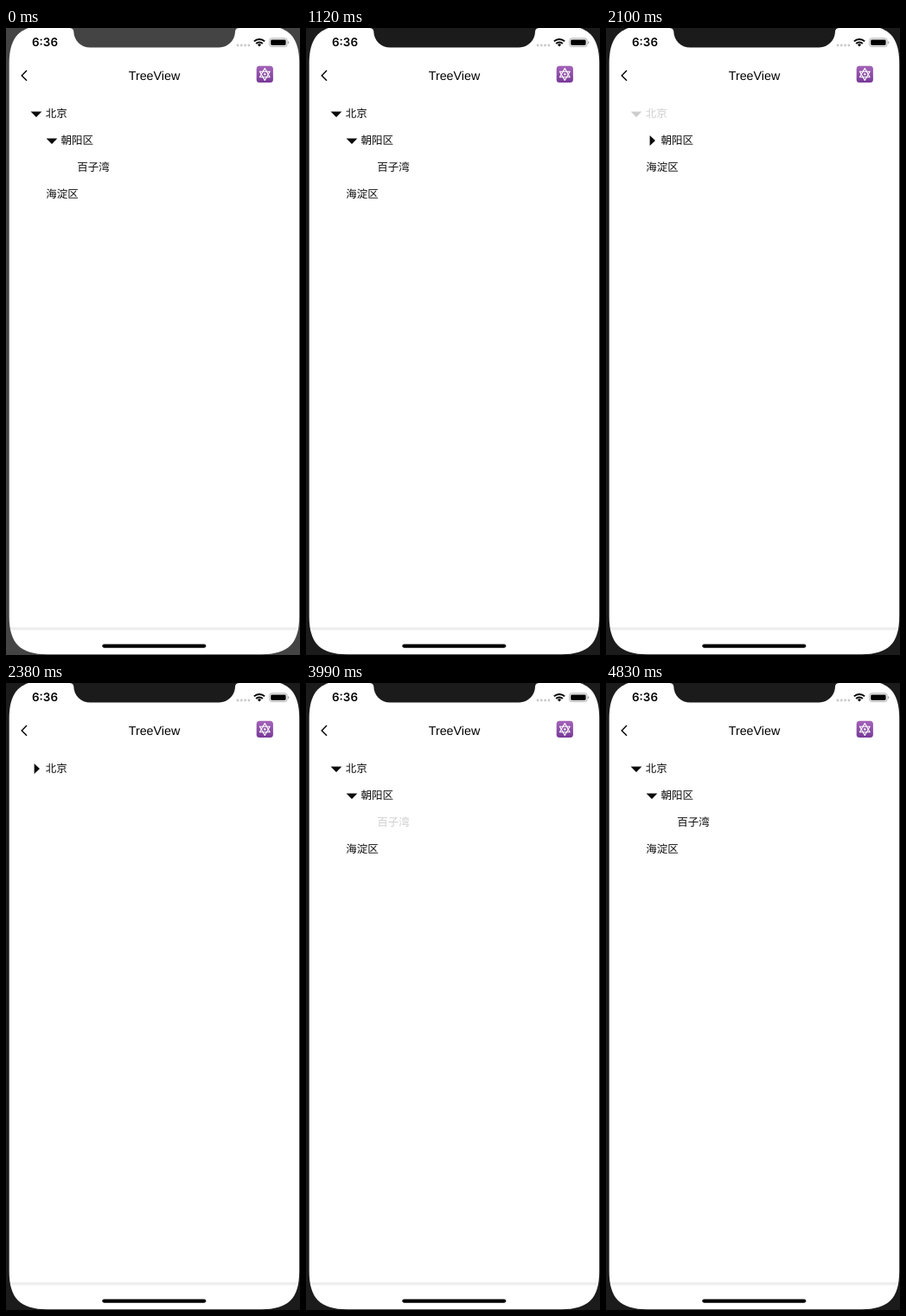
Animation of 340 by 724 pixels, one loop 5950 ms. Source, as an HTML page:

```html
<!DOCTYPE html>
<html lang="zh-CN">
<head>
<meta charset="utf-8">
<title>TreeView</title>
<style>
  html, body { margin: 0; width: 100%; height: 100%; overflow: hidden; background: #fff; }
  svg { display: block; width: 340px; height: 724px; }
  text { text-rendering: geometricPrecision; }
  .row { font: 12.53px "Noto Sans CJK SC", "Noto Sans CJK", sans-serif; fill: #0a0a0a; }
  .title { font: 14.3px "Liberation Sans", Arial, sans-serif; }
  .clock { font: 600 13.4px Inter, sans-serif; }
</style>
</head>
<body>
<svg viewBox="0 0 340 724">
  <defs>
    <linearGradient id="purple" x1="0" y1="0" x2="0" y2="1">
      <stop offset="0" stop-color="#a564b9"/>
      <stop offset="1" stop-color="#773a98"/>
    </linearGradient>
  </defs>

  <rect class="bezel" width="340" height="724"/>
  <path id="screen" fill="#fff"/>
  <path class="bezel" d="M73 0Q78 0 78.3 4C78.4 14.4 86.9 22.6 97.4 22.6H246C256.5 22.6 264.8 14.4 265 4Q265.3 0 270 0Z"/>

  <text class="clock" x="45" y="21.4" text-anchor="middle">6:36</text>
  <g fill="#c8c8c8">
    <circle cx="268" cy="20" r="1.4"/>
    <circle cx="272.3" cy="20" r="1.4"/>
    <circle cx="276.6" cy="20" r="1.4"/>
    <circle cx="280.9" cy="20" r="1.4"/>
  </g>
  <g fill="none" stroke="#000" stroke-width="2">
    <path d="M286.9 15.4A8.7 8.7 0 0 1 299.1 15.4"/>
    <path d="M289.2 18A5.4 5.4 0 0 1 296.8 18"/>
  </g>
  <path d="M290.9 19.2A3 3 0 0 1 295.1 19.2L293 21.4Z"/>
  <rect x="304.7" y="11.9" width="20.4" height="9.6" rx="2.7" fill="none" stroke="#a6a6a6" stroke-width=".9"/>
  <rect x="306.2" y="13.4" width="17.4" height="6.6" rx="1.4"/>
  <path d="M326 15.2Q327.4 15.6 327.4 16.7T326 18.2Z" fill="#a6a6a6"/>

  <path d="M24 49L18.2 54.9L24 60.8" fill="none" stroke="#000" stroke-width="1.4"/>
  <text class="title" x="171.5" y="60" text-anchor="middle">TreeView</text>

  <rect x="289.7" y="43.8" width="19.2" height="19.2" rx="3.5" fill="url(#purple)"/>
  <g fill="none" stroke="#fff" stroke-width="1.1" stroke-linejoin="round">
    <path d="M299.3 46.6L305.2 56.8H293.4Z"/>
    <path d="M299.3 60.4L293.4 50.2H305.2Z"/>
  </g>
  <circle cx="299.3" cy="53.5" r="1.3" fill="#fff"/>

  <g id="tree"></g>

  <rect x="5" y="692" width="331" height="3.4" fill="#eee"/>
  <rect x="111.3" y="711.5" width="120" height="4.2" rx="2.1"/>
</svg>
<script>
const LOOP = 5950, STEP = 70, FADE = 250, DIM = 0.2;
const ROW_TOP = 99, ROW_GAP = 31;

const rows = {
  city:   { text: '北京', x: 45.7, arrow: 35 },
  area:   { text: '朝阳区', x: 63.6, arrow: 53 },
  place:  { text: '百子湾', x: 82.2 },
  nearby: { text: '海淀区', x: 46.3 }
};

// A row dims at `down` and fades back from `up`.
const taps = [
  { row: 'area', down: 1190, up: 1130 },
  { row: 'city', down: 2100, up: 2120 },
  { row: 'city', down: 2800, up: 2740 },
  { row: 'place', down: 3990, up: 4010 },
  { row: 'nearby', down: 4480, up: 4560 }
];

const tree = document.getElementById('tree');
const bezel = document.querySelectorAll('.bezel');

function add(parent, tag, attrs) {
  const el = document.createElementNS('http://www.w3.org/2000/svg', tag);
  for (const key in attrs) el.setAttribute(key, attrs[key]);
  return parent.appendChild(el);
}

// Rectangle with smooth corners: `r` is their reach, `c` the handle's gap to the corner.
function smoothRect(l, t, r, b, reach, c) {
  return `M${l} ${t + reach}C${l} ${t + c} ${l + c} ${t} ${l + reach} ${t}` +
    `H${r - reach}C${r - c} ${t} ${r} ${t + c} ${r} ${t + reach}` +
    `V${b - reach}C${r} ${b - c} ${r - c} ${b} ${r - reach} ${b}` +
    `H${l + reach}C${l + c} ${b} ${l} ${b - c} ${l} ${b - reach}Z`;
}

document.getElementById('screen')
  .setAttribute('d', smoothRect(3.7, -3, 339.2, 723.2, 44, 12.7));

for (const row of Object.values(rows)) {
  row.el = add(tree, 'g', { class: 'row' });
  add(row.el, 'text', { x: row.x, y: 3.8 }).textContent = row.text;
  if (row.arrow) row.mark = add(row.el, 'path', {});
}

const easeInOut = p => p < 0.5 ? 2 * p * p : 1 - 2 * (1 - p) * (1 - p);

function opacity(name, t) {
  const tap = taps.find(k => k.row === name && t >= k.down && t < k.up + FADE);
  if (!tap) return 1;
  return DIM + (1 - DIM) * easeInOut(Math.max(0, (t - tap.up) / FADE));
}

function arrowPath(x, open) {
  return open
    ? `M${x - 6.4} -2.4H${x + 6.4}L${x} 4Z`
    : `M${x - 2.4} -6.1V6L${x + 4} 0Z`;
}

function draw(time) {
  const t = Math.floor((time % LOOP) / STEP) * STEP;
  const cityOpen = t < 2170 || t >= 2800;
  const areaOpen = t < 1190 || t >= 3430;
  const shown = {
    city: true,
    area: cityOpen,
    place: cityOpen && areaOpen,
    nearby: cityOpen
  };

  bezel.forEach(el => el.setAttribute('fill', t < 1120 ? '#444' : '#1b1b1b'));
  rows.city.mark.setAttribute('d', arrowPath(rows.city.arrow, cityOpen));
  rows.area.mark.setAttribute('d', arrowPath(rows.area.arrow, areaOpen));

  let y = ROW_TOP;
  for (const [name, row] of Object.entries(rows)) {
    row.el.setAttribute('display', shown[name] ? 'inline' : 'none');
    if (!shown[name]) continue;
    row.el.setAttribute('transform', `translate(0 ${y})`);
    row.el.setAttribute('opacity', opacity(name, t));
    y += ROW_GAP;
  }
}

const start = performance.now();
function tick() {
  draw(performance.now() - start);
  requestAnimationFrame(tick);
}
tick();
</script>
</body>
</html>
```
